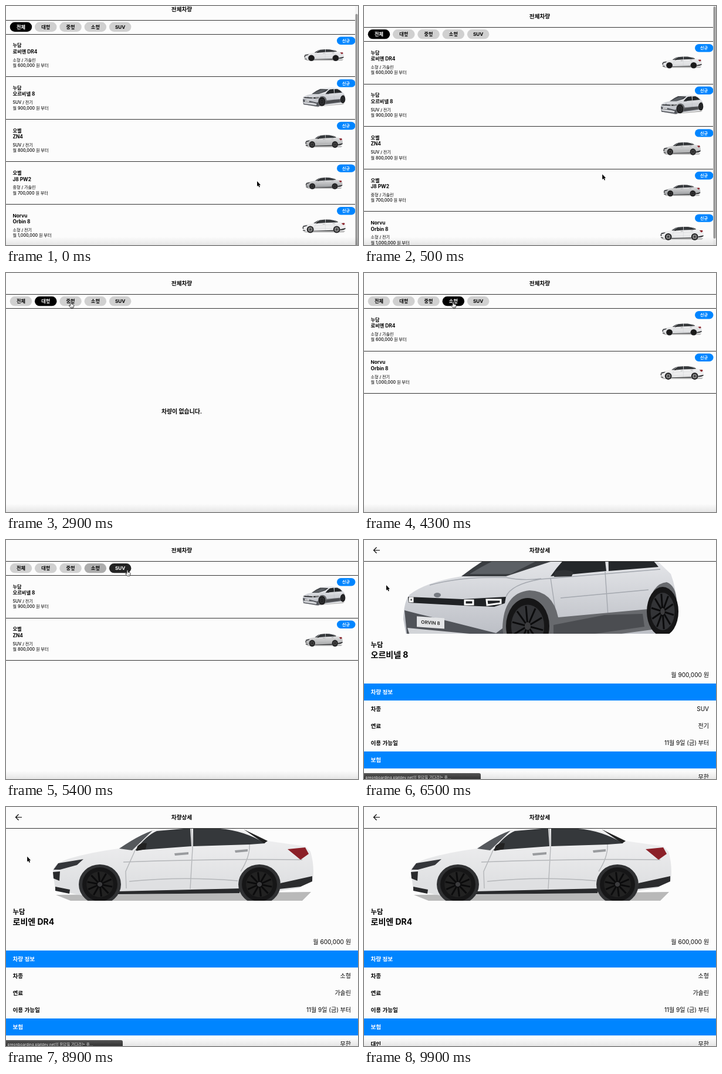
Animation of 600 by 408 pixels, one loop 10000 ms. Source, as an HTML page with a canvas:

```html
<!DOCTYPE html>
<html lang="ko">
<head>
<meta charset="utf-8">
<title>전체차량</title>
<style>
html, body { margin: 0; width: 100%; height: 100%; overflow: hidden; background: #fcfcfc; }
canvas { display: block; width: 600px; height: 408px; }
</style>
</head>
<body>
<canvas id="stage"></canvas>
<script>
const canvas = document.getElementById('stage');
const ctx = canvas.getContext('2d');
const ratio = window.devicePixelRatio || 1;
canvas.width = 600 * ratio;
canvas.height = 408 * ratio;

const LOOP = 10000, BLUE = '#0085ff', PAGE = '#fcfcfc', INK = '#000';
const FONT = '"Inter", "Noto Sans CJK KR", "Noto Sans CJK", sans-serif';
const ROW = 72.6;

const tabs = ['전체', '대형', '중형', '소형', 'SUV'];
const cars = [
  { maker: '누담', name: '로비엔 DR4', type: '소형', fuel: '가솔린', price: '600,000', draw: sedan, size: [68, 20], y: 36, paint: '#dfe0e2', rim: '#222' },
  { maker: '누담', name: '오르비넬 8', type: 'SUV', fuel: '전기', price: '900,000', draw: crossover, size: [72, 33], y: 35.5 },
  { maker: '오벨', name: 'ZN4', type: 'SUV', fuel: '전기', price: '800,000', draw: sedan, size: [64, 22], y: 38, paint: '#b3b4b5', rim: '#555' },
  { maker: '오벨', name: 'J8 PW2', type: '중형', fuel: '가솔린', price: '700,000', draw: sedan, size: [63, 20], y: 37, paint: '#a6a8aa', rim: '#444' },
  { maker: 'Norvu', name: 'Orbin 8', type: '소형', fuel: '전기', price: '1,000,000', draw: sedan, size: [74, 23], y: 37.5, paint: '#ececed', rim: '#aaa' },
];

// Time of each filter change and the tab it selects
const picks = [[0, 0], [2000, 1], [3000, 2], [3680, 3], [5180, 4], [7100, 0]];
// Time a detail page opens and closes, its car, and when its picture arrives
const visits = [
  { from: 5950, to: 7100, car: cars[1], picture: 6450, status: [6150, 6900] },
  { from: 8300, to: LOOP, car: cars[0], picture: 8900, status: [8550, 9400] },
];
// time, x, y, hand
const pointer = [
  [0, 428, 299, 0], [400, 428, 299, 0], [1100, 42, 89, 0], [1200, 42, 89, 0],
  [1700, 66, 49, 1], [2300, 68, 48, 1], [2800, 110, 49, 1], [3300, 117, 50, 1],
  [3500, 152, 49, 1], [4700, 152, 49, 1], [5000, 207, 51, 1], [5450, 207, 51, 1],
  [5850, 38, 79, 1], [5950, 38, 79, 0], [6200, 38, 77, 0], [6500, 38, 77, 0],
  [6900, 21, 14, 1], [7150, 21, 14, 1], [7250, 21, 15, 1], [8000, 34, 77, 1],
  [8300, 34, 77, 0], [8700, 36, 82, 0], [8850, 36, 82, 0], [9850, 60, 415, 0], [LOOP, 60, 415, 0],
];

const clamp = v => Math.max(0, Math.min(1, v));
const smooth = p => p * p * (3 - 2 * p);
const mix = (a, b, p) => a + (b - a) * p;

function text(str, x, y, size, weight = 400, color = INK, align = 'left') {
  ctx.font = `${weight} ${size}px ${FONT}`;
  ctx.textAlign = align;
  ctx.fillStyle = color;
  ctx.fillText(str, x, y);
}

function rect(x, y, w, h, color) {
  ctx.fillStyle = color;
  ctx.fillRect(x, y, w, h);
}

function pill(x, y, w, h, color) {
  ctx.fillStyle = color;
  ctx.beginPath();
  ctx.roundRect(x, y, w, h, h / 2);
  ctx.fill();
}

function shape(d, fill, stroke, width = 1) {
  const path = new Path2D(d);
  if (fill) { ctx.fillStyle = fill; ctx.fill(path); }
  if (stroke) { ctx.strokeStyle = stroke; ctx.lineWidth = width; ctx.stroke(path); }
}

function oval(x, y, rx, ry, fill) {
  ctx.fillStyle = fill;
  ctx.beginPath();
  ctx.ellipse(x, y, rx, ry, 0, 0, 7);
  ctx.fill();
}

function shade(top, bottom, y0, y1) {
  const g = ctx.createLinearGradient(0, y0, 0, y1);
  g.addColorStop(0, top);
  g.addColorStop(1, bottom);
  return g;
}

function wheel(x, y, rx, ry, rim) {
  oval(x, y, rx, ry, '#161617');
  oval(x, y, rx * .76, ry * .76, rim);
  ctx.strokeStyle = '#0b0b0c';
  ctx.lineWidth = 3;
  ctx.beginPath();
  for (let i = 0; i < 10; i++) {
    const a = i * Math.PI / 5 + .2;
    ctx.moveTo(x, y);
    ctx.lineTo(x + Math.cos(a) * rx * .72, y + Math.sin(a) * ry * .72);
  }
  ctx.stroke();
  oval(x, y, rx * .14, ry * .14, '#3c3c3e');
}

// Both cars are drawn at detail size, centred on (300, 98)
function sedan({ paint, rim }) {
  shape('M85 150L520 145L505 160L110 160Z', '#b9b9b9');
  shape('M80 108Q82 96 108 88Q145 77 192 71Q238 43 262 37Q310 29 365 33Q410 38 446 58L510 67L519 76Q526 100 523 124L500 138L455 145L130 151L84 142Z', shade('#f1f1f2', paint, 40, 130));
  shape('M193 71Q235 42 262 37L250 40L215 74Z', '#55585c');
  shape('M220 74Q240 48 257 41L314 36L316 67Z', '#35383b');
  shape('M319 36L365 37Q405 40 442 62L415 64L319 67Z', '#35383b');
  shape('M405 38L446 58L440 62Z', '#222');
  shape('M316 36L318 70L314 140M415 64Q416 85 400 110M220 74L204 110L205 139M200 94Q360 88 505 90M210 127Q300 118 395 126', null, '#b4b6b9', 1.4);
  shape('M224 67Q231 60 240 62L238 72L222 75Z', '#222');
  shape('M287 79L311 77L311 81L288 83ZM390 74L412 72L412 76L391 78Z', '#999b9e');
  shape('M81 107L89 96L132 89L121 99L92 107Z', '#34363a');
  shape('M80 111L92 110L91 126L81 122ZM84 136L109 141L108 148L84 143Z', '#292a2c');
  shape('M480 72L510 69L516 80L502 90Z', '#8b2028');
  shape('M468 130L522 118L522 127L502 136L466 140Z', '#2b2c2e');
  shape('M190 144L400 139L398 147L190 149Z', '#292a2c');
  oval(160, 132, 36, 34, '#303133');
  oval(432, 132, 36, 34, '#303133');
  wheel(160, 132, 30, 29, rim);
  wheel(432, 132, 30, 29, rim);
}

function crossover() {
  shape('M75 176L250 204L300 190L530 166L510 178L300 196L230 207Z', '#aaa');
  shape('M67 135Q68 104 78 93Q105 72 166 62Q215 24 258 5Q350 -16 440 -4Q475 2 492 28L523 58Q537 95 530 140L500 160L310 185L230 202L75 178Z', shade('#e9eaed', '#b9bcc3', 20, 170));
  shape('M166 62Q215 24 258 7Q315 6 352 10L318 37L242 62Z', '#3a3d41');
  shape('M180 58Q225 30 270 15L330 18L250 58Z', '#5c6065');
  shape('M318 62Q340 30 365 13L408 8L413 53Z', '#24272a');
  shape('M416 9L448 7Q480 17 502 46L417 53Z', '#24272a');
  shape('M112 77Q166 62 242 64Q270 70 302 66M242 97Q250 76 300 67L505 50M411 54L416 130M318 65L330 145M335 99Q430 90 485 85', null, '#a4a8af', 1.4);
  shape('M325 54Q343 48 357 55L354 62L324 63Z', '#303235');
  shape('M75 97L168 101L242 97L240 108L222 114L170 112L76 107Z', '#202225');
  shape('M172 103H186V110H172ZM209 102H233V108L210 111ZM78 99H83V105H78Z', null, '#fff', 3);
  shape('M69 120L92 126L150 140L225 159L248 142L245 202L75 178Z', '#505359');
  shape('M74 150L180 160L222 172L215 188L80 169Z', '#d2d4d8');
  shape('M236 150Q238 90 282 86Q322 87 331 132L484 118Q490 74 516 72Q532 78 533 105L528 148L320 176L300 190L242 198Z', '#686a6e');
  shape('M323 145L410 128L475 126L478 148L323 170Z', '#4b4d51');
  wheel(279, 147, 37, 48, '#333437');
  wheel(509, 122, 27, 42, '#333437');
  oval(125, 94, 6, 4, '#777b82');
  ctx.save();
  ctx.transform(1, .07, 0, 1, 0, -8);
  rect(90, 132, 47, 18, '#e4e5e7');
  text('ORVIN 8', 113.5, 144, 8, 600, '#222', 'center');
  ctx.restore();
}

function thumbnail(car, top) {
  const full = car.draw === sedan ? [447, 130] : [466, 214];
  ctx.save();
  ctx.translate(542, top + car.y);
  ctx.scale(car.size[0] / full[0], car.size[1] / full[1]);
  ctx.translate(-301, -98);
  car.draw(car);
  ctx.restore();
}

function header(title) {
  text(title, 299.5, 21.4, 9.6, 700, INK, 'center');
}

function drawRow(car, top) {
  text(car.maker, 11.5, top + 22.8, 8.2, 700);
  text(car.name, 11.5, top + 33.2, 8.3, 700);
  text(`${car.type} / ${car.fuel}`, 11.5, top + 47, 7.1, 500);
  text(`월 ${car.price} 원 부터`, 11.5, top + 56.4, 7.1, 500);
  thumbnail(car, top);
  pill(564, top + 5, 31.5, 13.4, BLUE);
  text('신규', 579.5, top + 14.4, 7.1, 700, '#fff', 'center');
}

function drawList(t) {
  const index = picks.findLastIndex(p => t >= p[0]);
  const [since, tab] = picks[index];
  const animated = index > 0 && since !== 7100;
  const before = animated ? picks[index - 1][1] : tab;
  const fade = 1 - (1 - clamp((t - since) / 500)) ** 3;
  const scroll = 12.4 * (1 - smooth(clamp((t - 50) / 400)));
  const line = y => rect(0, Math.round(y - scroll), 600, 1, '#333');

  ctx.save();
  ctx.translate(0, -scroll);
  header('전체차량');
  tabs.forEach((label, i) => {
    const level = i === tab ? (animated ? fade : 1) : i === before ? 1 - fade : 0;
    const x = 6.7 + i * 42.3, grey = Math.round(mix(208, 0, level));
    pill(x, 40, 37.5, 16.3, `rgb(${grey},${grey},${grey})`);
    text(label, x + 18.8, 51.1, 8.2, 700, level > .5 ? '#fff' : INK, 'center');
  });
  const loading = index > 0 && t - since < 150;
  const shown = loading ? [] : cars.filter(c => tab === 0 || c.type === tabs[tab]);
  shown.forEach((car, i) => drawRow(car, 60 + i * ROW));
  if (!shown.length) text('차량이 없습니다.', 299.5, 239.6, 9.9, 700, INK, 'center');
  ctx.restore();

  line(36);
  for (let i = 0; i <= shown.length; i++) line(60 + i * ROW);

  const bar = 1 - clamp((t - 850) / 400);
  if (bar > 0) {
    ctx.globalAlpha = bar;
    rect(595, 0, 5, 408, '#f3f3f3');
    pill(595.5, 1 + scroll, 4, 396, '#999');
    ctx.globalAlpha = 1;
  }
}

function drawDetail({ car, picture, status }, t) {
  if (t >= picture) {
    ctx.save();
    ctx.beginPath();
    ctx.rect(0, 36, 600, 124);
    ctx.clip();
    car.draw(car);
    ctx.restore();
  }
  header('차량상세');
  shape('M27 17.5H17M21.5 12.5L16.5 17.5L21.5 22.5', null, INK, 1.2);
  rect(0, 36, 600, 1, '#333');
  text(car.maker, 11.5, 183.2, 11.4, 600);
  text(car.name, 11.5, 200.5, 14, 700);
  text(`월 ${car.price} 원`, 588, 234, 10.1, 400, INK, 'right');

  const section = (label, y) => {
    rect(0, y, 600, 29, BLUE);
    text(label, 11.5, y + 18, 9.6, 700, '#fff');
  };
  const field = (label, value, y) => {
    text(label, 11.5, y, 9.6, 700);
    text(value, 588, y, 10, 400, INK, 'right');
  };
  section('차량 정보', 245);
  field('차종', car.type, 292);
  field('연료', car.fuel, 321);
  field('이용 가능일', '11월 9일 (금) 부터', 350);
  section('보험', 361);
  field('대인', '무한', 408);

  const level = clamp((t - status[0]) / 150) * (1 - clamp((t - status[1]) / 200));
  if (level > 0) {
    ctx.globalAlpha = level;
    ctx.fillStyle = shade('#555', '#333', 398, 408);
    ctx.beginPath();
    ctx.roundRect(-4, 398, 203, 14, 3);
    ctx.fill();
    text('preonboarding.platdev.net의 응답을 기다리는 중...', 2.5, 407.6, 6.5, 400, '#eee');
    ctx.globalAlpha = 1;
  }
}

function drawPointer(t) {
  const i = pointer.findLastIndex(p => t >= p[0]);
  const a = pointer[i], b = pointer[i + 1] || a;
  const p = smooth(clamp((t - a[0]) / (b[0] - a[0] || 1)));
  ctx.save();
  ctx.translate(mix(a[1], b[1], p), mix(a[2], b[2], p));
  ctx.lineJoin = 'round';
  if (a[3]) {
    shape('M-1 .8Q0 -.6 1 .8V4L4.3 4.8Q5.3 5.2 5 6.8L4 10.3H-.4L-3.3 6.8Q-3.4 5.2 -1 6.6Z', '#fff', '#222', .9);
    shape('M1 7V9M2.6 7V9', null, '#555', .5);
  } else {
    shape('M0 0V9L2 7.2L3.5 10.4L4.9 9.8L3.5 6.7H6Z', INK, '#fff', 1.2);
    shape('M0 0V9L2 7.2L3.5 10.4L4.9 9.8L3.5 6.7H6Z', INK);
  }
  ctx.restore();
}

function render(now) {
  const t = now % LOOP;
  ctx.setTransform(ratio, 0, 0, ratio, 0, 0);
  rect(0, 0, 600, 408, PAGE);
  const visit = visits.find(v => t >= v.from && t < v.to);
  if (!visit) drawList(t);
  rect(0, 394, 600, 14, shade('rgba(0,0,0,0)', 'rgba(0,0,0,.09)', 394, 408));
  if (visit) drawDetail(visit, t);
  drawPointer(t);
}

const start = performance.now();
function tick() {
  render(performance.now() - start);
  requestAnimationFrame(tick);
}
tick();
</script>
</body>
</html>
```
